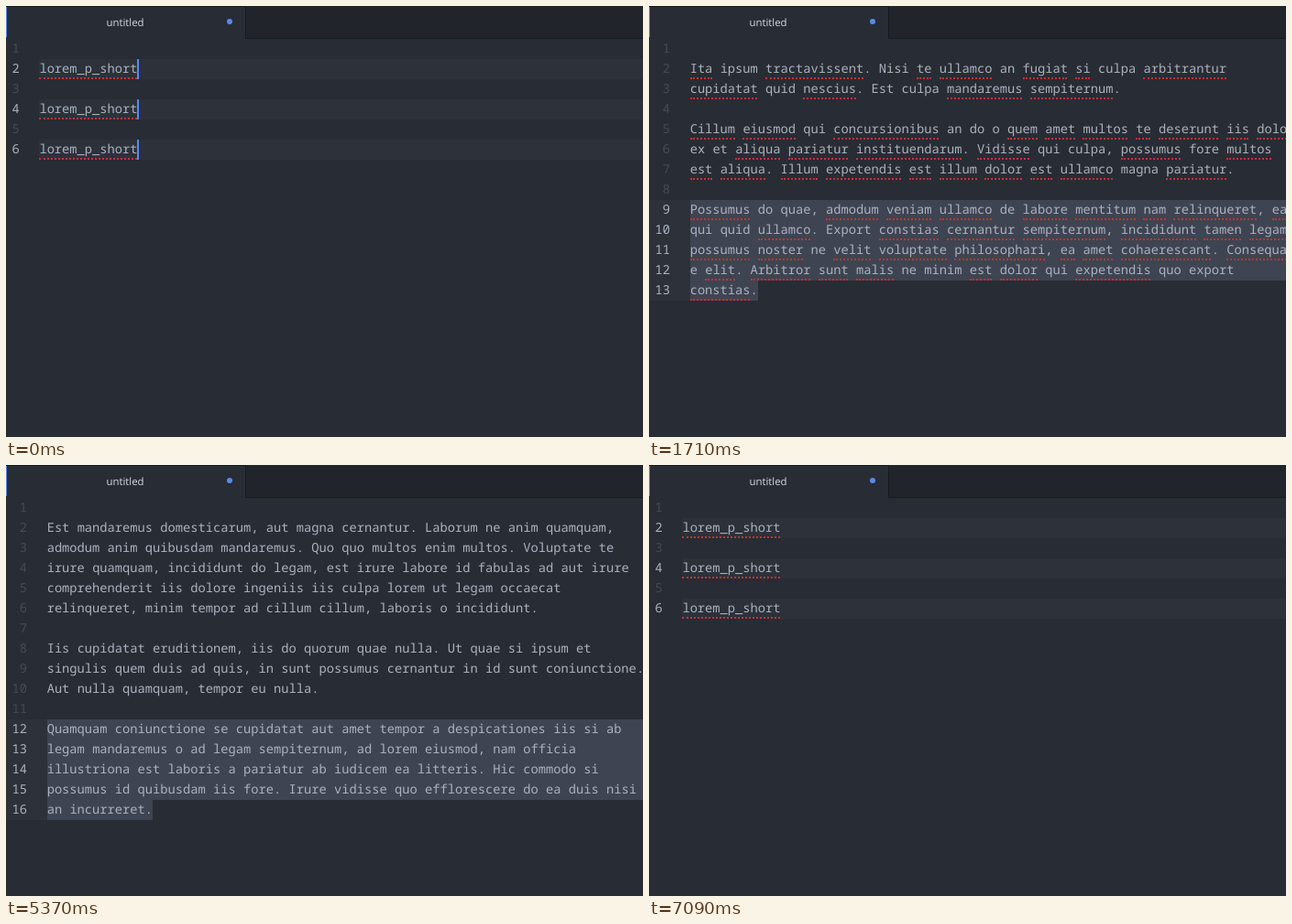
Recreate the animation shown at these times as an HTML page. Size 695 by 471 pixels, loop 7.4 s.

```html
<!DOCTYPE html>
<html lang="la">
<head>
<meta charset="utf-8">
<title>untitled</title>
<style>
html, body { margin: 0; width: 100%; height: 100%; overflow: hidden; background: #282c34; }
#stage {
  position: relative; width: 695px; height: 471px; overflow: hidden; background: #282c34;
  font: 13.745px/22px "Noto Sans Mono", "DejaVu Sans Mono", monospace;
  color: #abb2bf; text-rendering: geometricPrecision;
}
#stage div, #stage span, #stage i { position: absolute; box-sizing: border-box; white-space: pre; }
.bar { left: 0; top: 0; width: 695px; height: 36px; background: #21252b; border-bottom: 1px solid #181a1f; }
.tab {
  left: 0; top: 0; width: 262px; height: 36px; background: #282c34;
  border-top: 1px solid #181a1f; border-right: 1px solid #181a1f;
}
.strip { left: 0; top: 1px; width: 1px; height: 33px; background: #568af2; }
.title {
  left: 0; top: 8px; width: 260px; text-align: center; color: #d7dae0;
  font: 11.4px/22px "Open Sans", "Noto Sans", sans-serif;
}
.dot { left: 241px; top: 14px; width: 6px; height: 6px; border-radius: 50%; background: #568af2; }
.doc { left: 0; top: 0; width: 695px; height: 471px; visibility: hidden; }
.doc.on { visibility: visible; }
.row { left: 0; width: 695px; height: 22px; }
.num { color: #454b59; }
.num.active { color: #abb2bf; }
.shade { top: 0; height: 22px; background: #2c313a; }
.pick { top: 0; height: 22px; background: #3e4451; }
.bad { top: 20px; height: 2px; border-bottom: 2px dotted #c93133; visibility: hidden; }
.on.checked .bad { visibility: visible; }
.caret { top: 0; width: 2px; height: 22px; background: #528bff; visibility: hidden; }
.on.blink .caret { visibility: visible; }
</style>
</head>
<body>
<div id="stage">
  <div class="bar"></div>
  <div class="tab"></div>
  <div class="strip"></div>
  <div class="title">untitled</div>
  <div class="dot"></div>
</div>
<script>
const CHAR = 8.247, ROW = 22, TOP = 36, WIDTH = 695, LOOP = 7400;
const stage = document.getElementById('stage');

// Words the spell checker accepts
const known = new Set(('ipsum Nisi nisi an culpa quid Est do o magna ex et fore ne id ad ab a in de ' +
  'minim export Export lorem Hic quorum se quo Quo qui quae e').split(' '));

const snippet = `
lorem_p_short

lorem_p_short

lorem_p_short`;

const first = `
Ita ipsum tractavissent. Nisi te ullamco an fugiat si culpa arbitrantur
cupidatat quid nescius. Est culpa mandaremus sempiternum.

Cillum eiusmod qui concursionibus an do o quem amet multos te deserunt iis dolore
ex et aliqua pariatur instituendarum. Vidisse qui culpa, possumus fore multos
est aliqua. Illum expetendis est illum dolor est ullamco magna pariatur.

Possumus do quae, admodum veniam ullamco de labore mentitum nam relinqueret, ea
qui quid ullamco. Export constias cernantur sempiternum, incididunt tamen legam
possumus noster ne velit voluptate philosophari, ea amet cohaerescant. Consequat
e elit. Arbitror sunt malis ne minim est dolor qui expetendis quo export
constias.`;

const second = `
Est mandaremus domesticarum, aut magna cernantur. Laborum ne anim quamquam,
admodum anim quibusdam mandaremus. Quo quo multos enim multos. Voluptate te
irure quamquam, incididunt do legam, est irure labore id fabulas ad aut irure
comprehenderit iis dolore ingeniis iis culpa lorem ut legam occaecat
relinqueret, minim tempor ad cillum cillum, laboris o incididunt.

Iis cupidatat eruditionem, iis do quorum quae nulla. Ut quae si ipsum et
singulis quem duis ad quis, in sunt possumus cernantur in id sunt coniunctione.
Aut nulla quamquam, tempor eu nulla.

Quamquam coniunctione se cupidatat aut amet tempor a despicationes iis si ab
legam mandaremus o ad legam sempiternum, ad lorem eiusmod, nam officia
illustriona est laboris a pariatur ab iudicem ea litteris. Hic commodo si
possumus id quibusdam iis fore. Irure vidisse quo efflorescere do ea duis nisi
an incurreret.`;

function add(parent, tag, name, left, width, text) {
  const el = document.createElement(tag);
  el.className = name;
  el.style.left = left + 'px';
  if (width !== undefined) el.style.width = width + 'px';
  if (text) el.textContent = text;
  parent.appendChild(el);
  return el;
}

// selectFrom: first selected line, or 0 for one caret on every filled line
function makeDoc(text, selectFrom) {
  const lines = text.split('\n');
  const digits = String(lines.length).length;
  const left = 28.153 + digits * CHAR;
  const doc = add(stage, 'div', 'doc', 0);

  lines.forEach((line, i) => {
    const n = i + 1;
    const row = add(doc, 'div', 'row', 0);
    row.style.top = TOP + i * ROW + 'px';
    const end = left + line.length * CHAR;
    const active = selectFrom ? n >= selectFrom : line !== '';

    if (active && selectFrom) {
      const start = Math.round(left);
      const stop = n === lines.length ? Math.round(end) : WIDTH;
      add(row, 'div', 'shade', 0, start);
      add(row, 'div', 'pick', start, stop - start);
    } else if (active) {
      add(row, 'div', 'shade', 36, WIDTH - 36);
    }

    const label = String(n);
    add(row, 'span', active ? 'num active' : 'num', 6.4 + (digits - label.length) * CHAR, undefined, label);

    for (const { 0: word, index } of line.matchAll(/\w+|[.,]/g)) {
      const x = left + index * CHAR;
      add(row, 'span', '', x, undefined, word);
      if (/\w/.test(word) && !known.has(word)) {
        const a = Math.round(x), b = Math.floor(x + word.length * CHAR);
        add(row, 'i', 'bad', a, b - a);
      }
    }
    if (active && !selectFrom) add(row, 'div', 'caret', Math.floor(end), 2);
  });
  return doc;
}

const docs = [makeDoc(snippet, 0), makeDoc(first, 9), makeDoc(second, 12)];

// [start, document, spelling marks, caret]
const steps = [
  [0, 0, true, true], [280, 0, true, false], [740, 0, true, true], [1140, 0, true, false],
  [1270, 1, false, false], [1710, 1, true, false],
  [4230, 0, false, true], [4480, 0, true, true], [4790, 0, true, false], [5220, 0, true, true],
  [5370, 2, false, false], [5750, 2, true, false],
  [6680, 0, false, true], [6940, 0, true, true], [7090, 0, true, false]
];

let shown;
function draw(t) {
  const step = steps.findLast(s => s[0] <= t);
  if (step === shown) return;
  shown = step;
  const [, index, marks, caret] = step;
  docs.forEach((doc, i) => {
    doc.classList.toggle('on', i === index);
    doc.classList.toggle('checked', marks);
    doc.classList.toggle('blink', caret);
  });
}

const begin = performance.now();
function tick() {
  draw((performance.now() - begin) % LOOP);
  requestAnimationFrame(tick);
}
tick();
</script>
</body>
</html>
```
